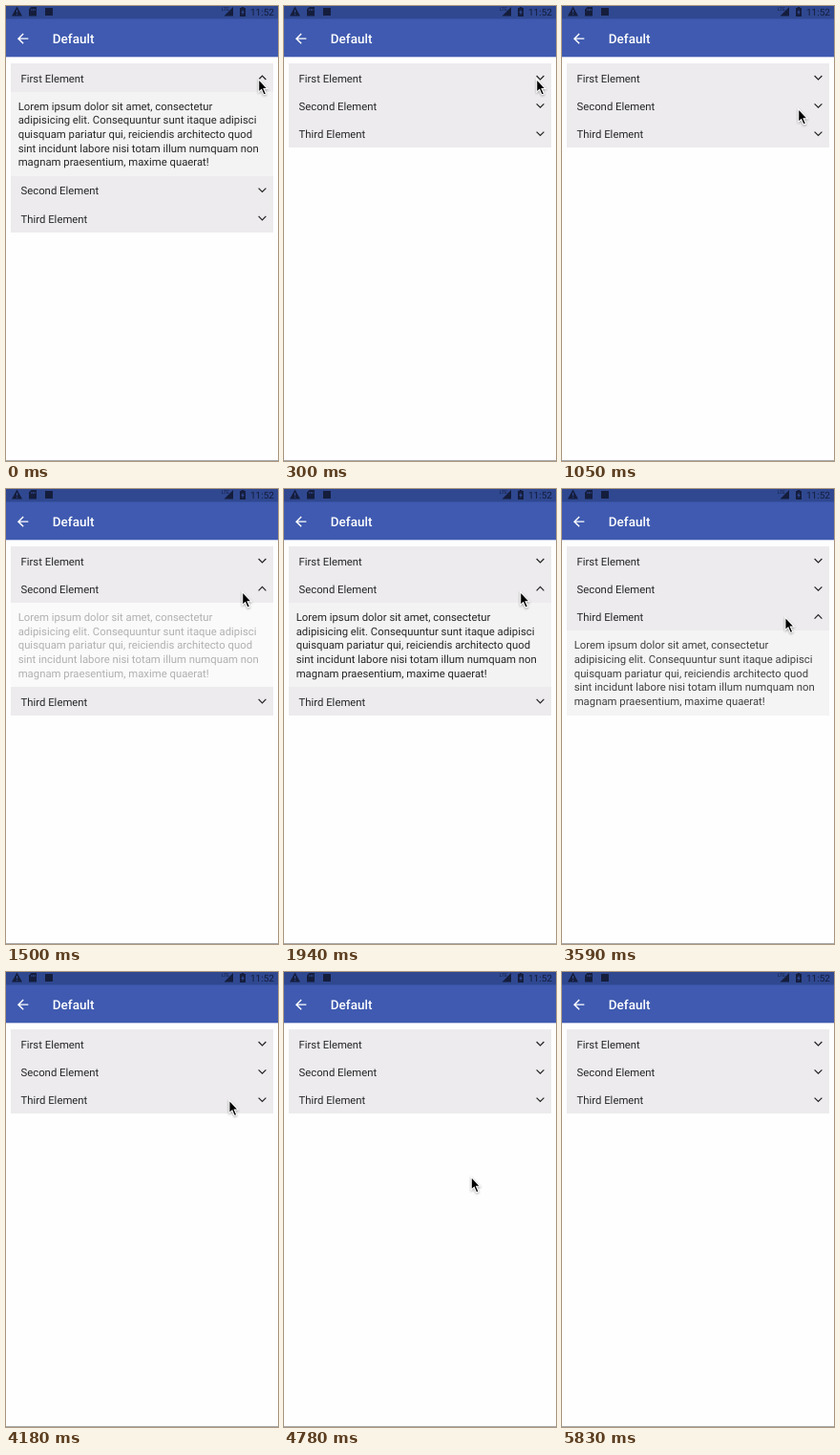
An HTML page for the animation above (6260 ms loop, 285 px wide and 476 px high).

```html
<!DOCTYPE html>
<html lang="en">
<head>
<meta charset="utf-8">
<title>Accordion</title>
<style>
  html, body { margin: 0; width: 100%; height: 100%; overflow: hidden; background: #fefefe; }
  svg { display: block; width: 285px; height: 476px; }
  text { font: 11.33px Roboto, sans-serif; fill: #262628; text-rendering: geometricPrecision; }
  #list rect { shape-rendering: crispEdges; }
  .status, .status text { fill: #151d3c; }
  .status text { font-size: 10px; }
  .status .tiny { font-size: 5px; }
  .title { font-size: 13.5px; font-weight: 500; fill: #fff; }
  .chevron { fill: none; stroke: #222; stroke-width: 1.2; }
  #cursor { filter: drop-shadow(0 1px 1px #0005); }
</style>
</head>
<body>
<svg viewBox="0 0 285 476">
  <rect width="285" height="476" fill="#fefefe"/>
  <rect width="285" height="53.3" fill="#3f5ab0"/>
  <rect width="285" height="13.4" fill="#2f4890"/>
  <g class="status">
    <path fill-rule="evenodd" d="M11.5 0.5L17 10.5H6ZM11 4V7H12.1V4ZM11 8V9.2H12.1V8Z"/>
    <path fill-rule="evenodd" d="M26.5 1H32V10.5H24V3.5ZM26.3 3V5H27.2V3ZM28 3V5H28.9V3ZM29.7 3V5H30.6V3Z"/>
    <rect x="41" y="2" width="8" height="8"/>
    <text class="tiny" x="226" y="5">LTE</text>
    <path d="M238 1V10.5H228.5Z"/>
    <path fill-rule="evenodd" d="M245 2H246.7V1H249.3V2H251V11H245ZM248.5 3.5L246.3 7H247.6V9.5L249.8 6H248.5Z"/>
    <text x="256" y="9.8">11:52</text>
  </g>
  <path fill="#fff" transform="translate(9.1 25.6) scale(.7125)"
    d="M20 11H7.83l5.59-5.59L12 4l-8 8 8 8 1.41-1.41L7.83 13H20z"/>
  <text class="title" x="48.8" y="39.3">Default</text>
  <g id="list"></g>
  <rect y="475" width="285" height="1" fill="#aaa"/>
  <path id="cursor" d="M0 0V13.6L3 10.9L5.4 16.4L7.8 15.4L5.4 10H9.4Z" stroke="#fff" stroke-width="1.1"/>
</svg>
<script>
const LOOP = 6260, STEP = 149.2;  // the screen refreshes once per step
const TOP = 60.4, ROW = 29.3, PANEL = 88.3, LINE = 14.7;
const names = ['First Element', 'Second Element', 'Third Element'];
const lines = [
  'Lorem ipsum dolor sit amet, consectetur',
  'adipisicing elit. Consequuntur sunt itaque adipisci',
  'quisquam pariatur qui, reiciendis architecto quod',
  'sint incidunt labore nisi totam illum numquam non',
  'magnam praesentium, maxime quaerat!'
];

const clamp = k => Math.min(1, Math.max(0, k));
const smooth = k => k * k * (3 - 2 * k);
const glide = k => k ** 3 * (10 - 15 * k + 6 * k * k);
const fling = k => 1 - (1 - k) ** 1.7;

// All times below are in steps.
const FADE = 4, LEAVE = 39;
const opened = [
  { from: 0, to: 2, fade: -FADE },
  { from: 10, to: 15, fade: 8.4 },
  { from: 22, to: 28, fade: 20.9 }
];
const home = { x: 264.7, y: 76.5 };
const hops = [
  { from: 4, to: 7, x: 247.7, y: 107.7, bend: -13, ease: glide },
  { from: 17, to: 20, x: 233.9, y: 134, bend: 0, ease: glide },
  { from: 30, to: 31, x: 196.2, y: 214.3, bend: 0, ease: fling },
  { from: 35, to: 38, x: 253.7, y: 474.7, bend: 42, ease: fling }
];

const list = document.getElementById('list');
const cursor = document.getElementById('cursor');
const box = (h, color) => `<rect x="5" width="275" height="${h}" fill="${color}"/>`;

list.innerHTML = names.map(name =>
  `<g>${box(ROW, '#edebed')}<text x="15.5" y="19.4">${name}</text><path class="chevron"/></g>`
).join('') + `<g>${box(PANEL, '#f3f3f3')}${lines.map((line, i) =>
  `<text x="12.7" y="${19 + i * LINE}">${line}</text>`).join('')}</g>`;

const rows = [...list.children];
const panel = rows.pop();
const place = (el, x, y) => el.setAttribute('transform', `translate(${x} ${y})`);

function drawList(n) {
  const open = opened.findIndex(o => n >= o.from && n < o.to);
  rows.forEach((row, i) => {
    place(row, 0, TOP + i * ROW + (open >= 0 && i > open ? PANEL : 0));
    row.lastChild.setAttribute('d', i === open
      ? 'M264.6 16.6L268.5 12.7L272.4 16.6'
      : 'M264.6 12.6L268.5 16.5L272.4 12.6');
  });
  place(panel, 0, TOP + (open + 1) * ROW);
  panel.setAttribute('opacity', open < 0 ? 0 : smooth(clamp((n - opened[open].fade) / FADE)));
}

function drawCursor(n) {
  let { x, y } = home;
  for (const hop of hops) {
    const k = hop.ease(clamp((n - hop.from) / (hop.to - hop.from)));
    x += (hop.x - x) * k + 2 * hop.bend * k * (1 - k);
    y += (hop.y - y) * k;
  }
  place(cursor, x, y);
  cursor.setAttribute('visibility', n < LEAVE ? 'visible' : 'hidden');
}

const start = performance.now();
function tick() {
  const n = Math.floor((performance.now() - start) % LOOP / STEP);
  drawList(n);
  drawCursor(n);
  requestAnimationFrame(tick);
}
tick();
</script>
</body>
</html>
```
